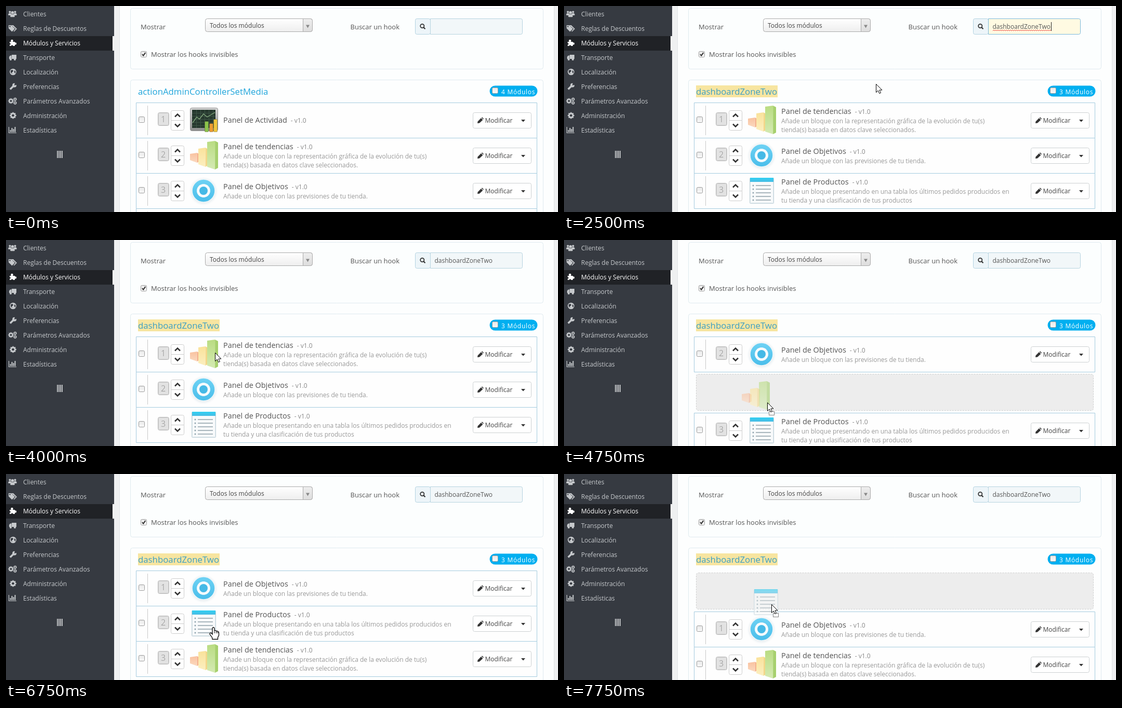
An HTML page with a canvas that plays this animation: 1062x397 px, repeating every 8 s.

```html
<!DOCTYPE html>
<html lang="es">
<head>
<meta charset="utf-8">
<title>Hooks</title>
<style>
html, body { margin: 0; width: 100%; height: 100%; overflow: hidden; background: #fff; }
canvas { display: block; }
</style>
</head>
<body>
<canvas id="stage" width="1062" height="397"></canvas>
<script>
const g = document.getElementById('stage').getContext('2d');
const LOOP = 8000, STEP = 250;
const ROW_TOP = 186, ROW_H = 68, GAP_H = 79;
const HOOK = 'dashboardZoneTwo';

const MENU = ['Clientes', 'Reglas de Descuentos', 'Módulos y Servicios', 'Transporte', 'Localización',
  'Preferencias', 'Parámetros Avanzados', 'Administración', 'Estadísticas'];

const MODULES = {
  activity: { title: 'Panel de Actividad', text: [] },
  trends: { title: 'Panel de tendencias', text: [
    'Añade un bloque con la representación gráfica de la evolución de tu(s)',
    'tienda(s) basada en datos clave seleccionados.'] },
  goals: { title: 'Panel de Objetivos', text: ['Añade un bloque con las previsiones de tu tienda.'] },
  products: { title: 'Panel de Productos', text: [
    'Añade un bloque presentando en una tabla los últimos pedidos producidos en',
    'tu tienda y una clasificación de tus productos'] }
};

// time, pointer kind, tip x, tip y
const POINTER = [
  [0, 'none', 0, 0], [250, 'arrow', 996, 50], [500, 'beam', 968, 42], [750, 'beam', 940, 30],
  [1000, 'beam', 934, 25], [1500, 'none', 0, 0],
  [2000, 'beam', 930, 30], [2250, 'arrow', 800, 75], [2500, 'arrow', 600, 150],
  [2750, 'hand', 460, 203], [3000, 'hand', 408, 216], [3250, 'hand', 401, 213],
  [3500, 'hand', 402, 215], [3750, 'arrow', 402, 217],
  [4250, 'drag', 402, 235], [4500, 'drag', 397, 268], [4750, 'drag', 391, 313],
  [5000, 'drag', 391, 346], [5250, 'drag', 391, 370],
  [5750, 'hand', 391, 368], [6000, 'hand', 393, 348], [6250, 'hand', 396, 322],
  [6500, 'hand', 398, 303], [6750, 'hand', 399, 295],
  [7500, 'drag', 392, 283], [7750, 'drag', 399, 251]
];

function text(s, x, y, size, color, weight = 400) {
  g.font = `${weight} ${size}px "Open Sans", sans-serif`;
  g.fillStyle = color;
  g.fillText(s, x, y);
  return g.measureText(s).width;
}

function rect(x, y, w, h, color) {
  g.fillStyle = color;
  g.fillRect(x, y, w, h);
}

// crisp bordered box
function box(x, y, w, h, r, fill, line) {
  g.beginPath();
  g.roundRect(x + .5, y + .5, w - 1, h - 1, r);
  if (fill) { g.fillStyle = fill; g.fill(); }
  if (line) { g.strokeStyle = line; g.lineWidth = 1; g.stroke(); }
}

function poly(points, fill, line, width = 1) {
  g.beginPath();
  for (let i = 0; i < points.length; i += 2) g.lineTo(points[i], points[i + 1]);
  if (fill) { g.closePath(); g.fillStyle = fill; g.fill(); }
  if (line) { g.strokeStyle = line; g.lineWidth = width; g.stroke(); }
}

function disc(x, y, r, color) {
  g.beginPath();
  g.arc(x, y, r, 0, 7);
  g.fillStyle = color;
  g.fill();
}

function ring(x, y, r, width, color) {
  g.beginPath();
  g.arc(x, y, r, 0, 7);
  g.strokeStyle = color;
  g.lineWidth = width;
  g.stroke();
}

function ramp(y0, y1, a, b) {
  const fill = g.createLinearGradient(0, y0, 0, y1);
  fill.addColorStop(0, a);
  fill.addColorStop(1, b);
  return fill;
}

function gear(x, y, r, color) {
  ring(x, y, r * .6, r * .45, color);
  for (let i = 0; i < 8; i++) {
    const a = i * Math.PI / 4, c = Math.cos(a), s = Math.sin(a);
    poly([x + c * r * .7, y + s * r * .7, x + c * r, y + s * r], null, color, r * .38);
  }
}

function person(x, y, k, color) {
  disc(x, y - 3 * k, 2.6 * k, color);
  g.beginPath();
  g.roundRect(x - 4 * k, y, 8 * k, 5 * k, [3 * k, 3 * k, 1, 1]);
  g.fill();
}

function check(x, y, on) {
  box(x, y, 12, 12, 2, ramp(y, y + 12, '#e8e8e8', '#fafafa'), '#9a9a9a');
  if (on) poly([x + 3, y + 6, x + 5.2, y + 8.6, x + 9.3, y + 2.8], null, '#333', 2);
}

const menuIcons = [
  (y, c) => { person(7.5, y - 1, .8, c); person(17.5, y - 1, .8, c); person(12.5, y + 1, 1.05, c); },
  (y, c) => {
    poly([10, y - 6, 14, y - 6, 21, y + 1, 15.5, y + 6.5, 14.5, y + 5.5, 18.5, y + 1], c);
    poly([5, y - 6, 10, y - 6, 17, y + 1, 11.5, y + 6.5, 5, y], c);
    disc(7.5, y - 3.5, 1.2, '#363a41');
  },
  (y, c) => {
    rect(7, y - 2, 10, 8, c);
    disc(11.5, y - 4, 2.3, c); disc(18, y + 1.5, 2.2, c);
    disc(7.3, y + 2, 1.6, '#202226'); disc(11.8, y + 5.8, 1.6, '#202226');
  },
  (y, c) => {
    rect(11, y - 5, 9, 8, c);
    poly([6, y + 3, 6, y - 1, 8, y - 3.5, 10.5, y - 3.5, 10.5, y + 3], c);
    disc(9, y + 4, 2, c); disc(17, y + 4, 2, c);
  },
  (y, c) => {
    disc(13.5, y, 6.3, c);
    poly([9, y - 3, 13, y - 4, 14, y - 1, 11, y + 1, 12, y + 4, 9, y + 1], '#363a41');
    poly([16, y - 3, 18.5, y - 1, 18, y + 3, 16, y + 1], '#363a41');
  },
  (y, c) => {
    poly([8, y + 5.5, 15.5, y - 2], null, c, 3.5);
    disc(16.2, y - 2.3, 4, c);
    poly([16, y - 2, 17, y - 7, 21, y - 7, 21, y - 3], '#363a41');
  },
  (y, c) => { gear(9.5, y, 5.2, c); gear(17.5, y - 3.3, 3.3, c); gear(17.5, y + 3.7, 3.3, c); },
  (y, c) => gear(13.5, y, 6.3, c),
  (y, c) => {
    poly([5.5, y - 6, 5.5, y + 5.5, 20, y + 5.5], null, c, 1.2);
    [4, 8, 6, 10].forEach((h, i) => rect(7.5 + i * 3, y + 4 - h, 2, h, c));
  }
];

function sidebar() {
  rect(0, 0, 208, 397, '#363a41');
  rect(0, 58, 205, 28, '#202226');
  rect(205, 58, 3, 28, '#fff');
  MENU.forEach((label, i) => {
    const y = 15 + i * 28, color = i === 2 ? '#fff' : '#c6c9cc';
    menuIcons[i](y, color);
    text(label, 33, y + 5, 12, color);
  });
  for (let i = 0; i < 4; i++) rect(98 + i * 3, 279, 2, 14, '#b9bbbe');
}

function search(state) {
  const { focus, value, caret } = state;
  box(787, 24, 30, 31, 3, '#edf5f9', '#b3d3e1');
  ring(800.8, 38.5, 3.6, 1.8, '#333');
  poly([803.5, 41.2, 806.5, 44.2], null, '#333', 2.2);
  box(816, 24, 178, 31, [0, 3, 3, 0], focus ? '#fffae2' : '#f2f7f9', focus ? '#7cb9dc' : '#b7d4e0');
  if (value) text(value, 824.5, 44, 12, '#555');
  if (focus && value) {
    const wave = [];
    for (let x = 825; x < 938; x += 2) wave.push(x, x % 4 === 1 ? 48 : 46);
    poly(wave, null, '#ee4b42', 1);
  }
  if (caret) rect(value ? 937 : 825, 31, 1, 17, '#222');
}

function page(state) {
  rect(0, 0, 1062, 397, '#eff0f1');
  rect(218, 0, 837, 397, '#fdfefe');
  rect(218, 0, 1, 397, '#e0e4e6');
  rect(1054, 0, 1, 397, '#e0e4e6');
  sidebar();

  box(239, 4, 795, 118, 4, '#fcfefe', '#dfeaef');
  text('Mostrar', 259, 45, 13, '#555');
  box(383, 24, 207, 26, 4, ramp(24, 50, '#fff', '#eee'), '#aaa');
  box(571, 24, 19, 26, [0, 4, 4, 0], ramp(24, 50, '#eee', '#ddd'), '#aaa');
  poly([577, 36.5, 584, 36.5, 580.5, 42.5], '#888');
  text('Todos los módulos', 392, 42, 12, '#444');
  text('Buscar un hook', 662.5, 45, 13, '#555');
  check(259, 87, true);
  text('Mostrar los hooks invisibles', 279, 98, 13, '#555');
  search(state);

  box(239, 142, 795, 300, 4, '#fdfefe', '#dfeaef');
  if (state.filtered) rect(254, 153, 157, 23, '#f7e5a0');
  text(state.filtered ? HOOK : 'actionAdminControllerSetMedia', 254, 171, 16.8,
    state.filtered ? '#3c9fc4' : '#1fa5db');
  box(930, 153, 93, 22, 11, '#00aff0');
  check(935, 157, false);
  g.letterSpacing = '0.7px';
  text(state.filtered ? '3 Módulos' : '4 Módulos', 953, 170, 12, '#fff');
  g.letterSpacing = '0px';
}

const icons = {
  activity(y) {
    box(354, y + 10, 54, 45, 3, ramp(y + 10, y + 55, '#d8d8d8', '#8c8c8c'), '#8f8f8f');
    rect(358, y + 14, 45, 35, '#26382e');
    for (let i = 1; i < 6; i++) {
      rect(358 + i * 8, y + 14, 1, 35, '#3d5546');
      rect(358, y + 14 + i * 6, 45, 1, '#3d5546');
    }
    poly([359, y + 39, 367, y + 28, 372, y + 32, 380, y + 22, 387, y + 28, 402, y + 19], null, '#83a87d', 1.3);
    [[382, 21, '#8bc34a'], [391, 17, '#ed9b32'], [399, 25, '#f0c63c']].forEach(([x, h, c]) => {
      box(x, y + 57 - h, 8, h, 1, c, 'rgba(80,80,40,.4)');
    });
  },
  trends(y) {
    const bar = (x, w, top, bottom, light, dark, side) => {
      poly([x, y + top + 2, x + w * .72, y + top, x + w * .72, y + bottom, x, y + bottom - 5],
        ramp(y + top, y + bottom, light, dark));
      poly([x + w * .72, y + top, x + w, y + top + 3, x + w, y + bottom - 3, x + w * .72, y + bottom], side);
    };
    bar(354, 19, 29, 48, '#f9c2a0', '#fbd9bf', '#f4b08c');
    bar(370, 19, 19, 56, '#fae29a', '#fcefc0', '#f3d78a');
    bar(387, 21, 6, 61, '#b9dc82', '#d5eab3', '#a7d06e');
  },
  goals(y) {
    const halo = g.createRadialGradient(380, y + 35, 20, 380, y + 35, 28);
    halo.addColorStop(0, '#dfe7eb');
    halo.addColorStop(1, 'rgba(240,244,246,0)');
    disc(380, y + 35, 28, halo);
    disc(380, y + 34, 23, '#eef6f9');
    ring(380, y + 34, 17, 8.5, ramp(y + 12, y + 57, '#6ed2f4', '#49bdea'));
    disc(380, y + 34, 12.8, '#f7fbfd');
    disc(380, y + 34, 8, '#45b9e6');
  },
  products(y) {
    box(357, y + 9, 47, 50, 1, '#f8fafb', '#c3d3da');
    box(358, y + 10, 45, 48, 0, null, '#dce7ec');
    rect(358, y + 9, 45, 8, ramp(y + 9, y + 17, '#2fd0f3', '#49bce4'));
    for (let i = 0; i < 5; i++) {
      const ly = y + 23 + i * 7;
      disc(364, ly + 1, 1.5, '#8fa3ad');
      rect(369, ly, 29, 2, '#a9b6bd');
    }
  }
};

function chevron(x, y, dir) {
  poly([x - 5, y + 2.5 * dir, x, y - 2.5 * dir, x + 5, y + 2.5 * dir], null, '#333', 2.6);
}

function row(name, num, y) {
  const { title, text: lines } = MODULES[name];
  box(250, y, 772, ROW_H + 1, 0, '#fefefe', '#a4cbdf');
  check(255, y + 27, false);
  rect(272, y + 6, 1, 57, '#c9c9c9');
  box(292, y + 19, 22, 26, 3, '#e2e2e2', '#b9b9b9');
  box(293, y + 20, 20, 24, 2, null, '#cfcfcf');
  text(num, 298.4, y + 38, 16.5, '#fff');
  text(num, 298, y + 37.5, 16.5, '#a3a3a3');
  box(317, y + 15, 26, 20, [3, 3, 0, 0], '#fff', '#ccc');
  box(317, y + 34, 26, 20, [0, 0, 3, 3], '#fff', '#ccc');
  chevron(330, y + 25, 1);
  chevron(330, y + 44, -1);
  icons[name](y);

  const mid = y + [34, 26, 17][lines.length];
  const w = text(title, 418, mid + 5, 14.4, '#555');
  text('- v1.0', 418 + w + 7, mid + 5, 12, '#888');
  lines.forEach((s, i) => text(s, 418, mid + 23 + i * 17, 12, '#999'));

  box(898, y + 19, 113, 31, 3, '#fff', '#ccd0d2');
  poly([907, y + 40, 907.6, y + 36.5, 914, y + 30, 917.4, y + 33.4, 911, y + 39.6], '#333');
  poly([914.8, y + 29.2, 916, y + 28.2, 919, y + 31.2, 918.2, y + 32.6], '#333');
  text('Modificar', 921.5, y + 39, 12, '#444');
  poly([991, y + 33, 999, y + 33, 995, y + 37.5], '#333');
}

function list(items, slot) {
  items.forEach(([name, num], i) => {
    const shift = slot !== undefined && i >= slot ? GAP_H : 0;
    row(name, num, ROW_TOP + i * ROW_H + shift);
  });
  if (slot === undefined) return;
  const y = ROW_TOP + slot * ROW_H + 4;
  g.setLineDash([3, 2]);
  box(254, y, 765, 71, 4, '#ededed', '#cfcfcf');
  g.setLineDash([]);
}

function ghost(name, x, y) {
  g.save();
  g.globalAlpha = .6;
  g.translate(x, y);
  icons[name](0);
  g.restore();
}

const pointers = {
  none() {},
  arrow() {
    poly([.5, .5, .5, 16.5, 4.2, 13, 6.8, 18.6, 9.4, 17.4, 6.9, 12, 12, 12, .5, .5], '#fff', '#000');
  },
  drag() {
    g.setLineDash([1, 1]);
    box(3, 17, 11, 8, 0, '#fff', '#000');
    g.setLineDash([]);
    pointers.arrow();
  },
  beam() {
    poly([-3, -8.5, 0, -8, 3, -8.5], null, '#222');
    poly([.5, -8, .5, 8], null, '#222');
    poly([-3, 8.5, 0, 8, 3, 8.5], null, '#222');
  },
  hand() {
    g.beginPath();
    g.moveTo(-2, 14);
    g.lineTo(-2, 2);
    g.quadraticCurveTo(0, -1, 2, 2);
    g.lineTo(2, 7);
    g.quadraticCurveTo(5, 5.5, 5.5, 8);
    g.quadraticCurveTo(8, 6.5, 8.5, 9);
    g.quadraticCurveTo(10.5, 8.5, 10.5, 11);
    g.lineTo(10.5, 16);
    g.lineTo(8.5, 20);
    g.lineTo(8.5, 23.5);
    g.lineTo(-2, 23.5);
    g.lineTo(-2.5, 20);
    g.lineTo(-7, 13.5);
    g.quadraticCurveTo(-6.5, 10, -4, 11.5);
    g.closePath();
    g.fillStyle = '#fff';
    g.fill();
    g.strokeStyle = '#000';
    g.lineWidth = 1.3;
    g.stroke();
    for (const x of [2, 5.5, 8.3]) poly([x, 8, x, 12], null, '#000');
  }
};

function panels(t, x, y) {
  const trends = n => ['trends', n], goals = n => ['goals', n], products = n => ['products', n];
  if (t < 1500) {
    list([['activity', 1], trends(2), goals(3), ['products', 4]]);
  } else if (t < 4250) {
    list([trends(1), goals(2), products(3)]);
  } else if (t < 5750) {
    list([goals(2), products(3)], t < 4750 ? 0 : t < 5250 ? 1 : 2);
    ghost('trends', x - 403, y - 47);
  } else if (t < 7500) {
    list([goals(1), products(2), trends(3)]);
  } else {
    list([goals(1), trends(3)], t < 7750 ? 1 : 0);
    ghost('products', x - 391, y - 38);
  }
}

function draw(now) {
  const t = Math.floor(now % LOOP / STEP) * STEP;
  const filtered = t >= 1500;
  const focus = t >= 750 && t < 3500;
  const caret = focus && (t < 1500 || Math.floor(t / 500) % 2 === 1) && t < 3000;
  const [, kind, x, y] = POINTER.findLast(p => p[0] <= t);
  page({ filtered, focus, caret, value: filtered ? HOOK : '' });
  panels(t, x, y);
  g.save();
  g.translate(x, y);
  pointers[kind]();
  g.restore();
}

const start = performance.now();
function tick() {
  draw(performance.now() - start);
  requestAnimationFrame(tick);
}
tick();
</script>
</body>
</html>
```
